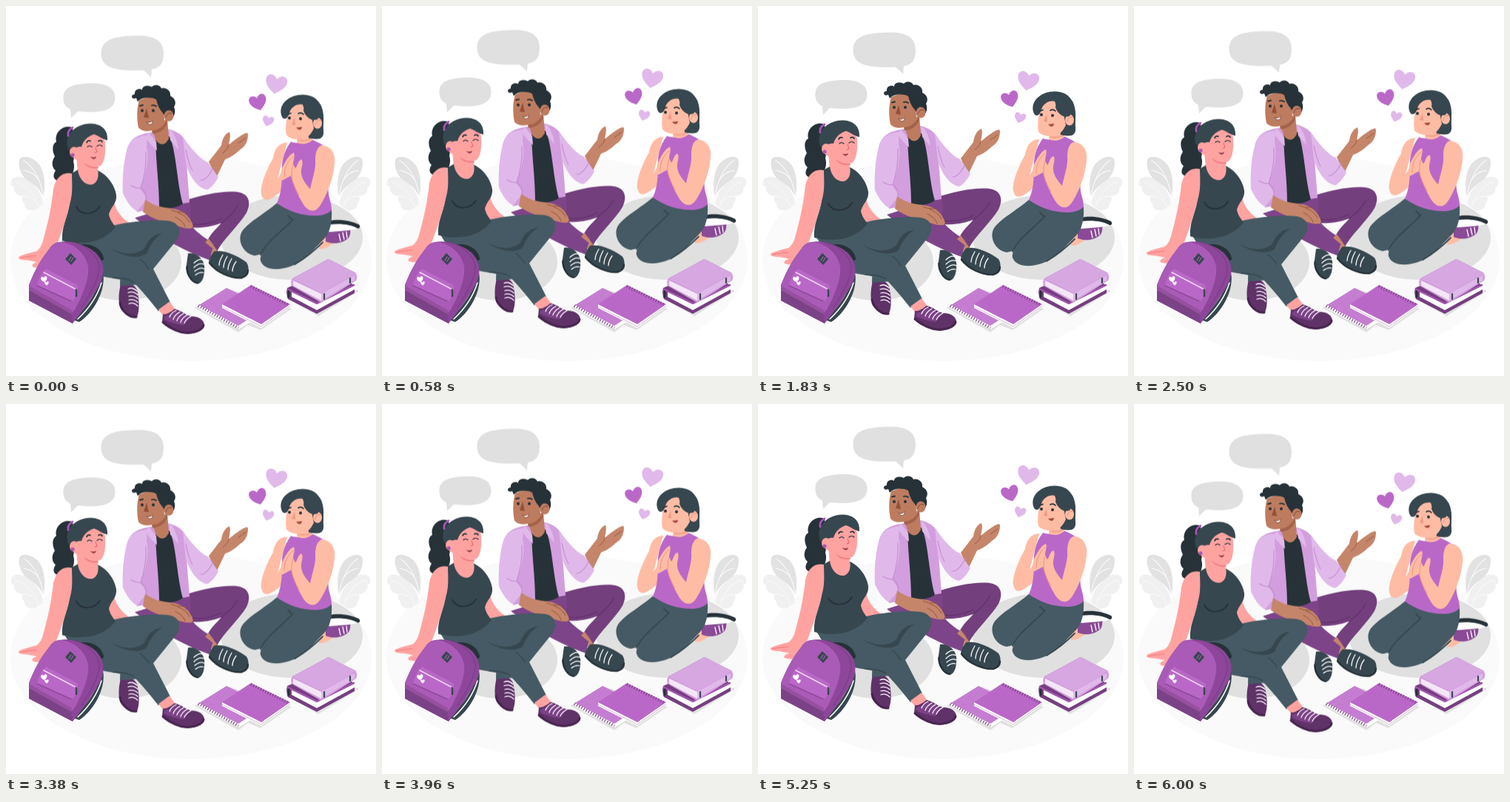
Write an HTML page that moves like this. It is 500x500 px and loops after 6.04 s.

```html
<!DOCTYPE html>
<html lang="en">
<head>
<meta charset="utf-8">
<title>Friends talking</title>
<style>
  html, body { margin: 0; width: 100%; height: 100%; overflow: hidden; background: #fff; }
  svg { display: block; width: 100vw; height: 100vh; }

  /* four 1.5 s bobs, then a 40 ms rest before the loop restarts */
  .float { animation: float 6.04s -.02s linear infinite; }
  @keyframes float {
    0%, 24.834%, 49.669%, 74.503%, 99.338%, 100% { transform: translateY(.6px); }
    12.417%, 37.252%, 62.086%, 86.921% { transform: translateY(-9.4px); }
  }

  .line { fill: none; stroke-linecap: round; stroke-linejoin: round; }
  .lace { fill: none; stroke: #fff; stroke-width: 1.3; stroke-linecap: round; }
  .coil { fill: none; stroke: #7c4287; stroke-width: 4; stroke-dasharray: 1.2 2.4; }
  .grey { fill: #e0e0e0; }
  .ink { fill: #263238; }
  .slate { fill: #37474f; }
  .denim { fill: #455a64; }
  .violet { fill: #ba68c8; }
  .lilac { fill: #e0b9ea; }
  .orchid { fill: #d29edd; }
  .plum { fill: #763f80; }
  .rose { fill: #ffa3a1; }
  .peach { fill: #ffbca5; }
  .brown { fill: #c5856a; }
  .tan { fill: #bd7c60; }
  .s-ink { stroke: #263238; }
  .s-slate { stroke: #37474f; }
</style>
</head>
<body>
<svg viewBox="0 0 500 500">
  <defs>
    <path id="heart" d="M0 9C-4 6-10 2-10-4C-10-10-3-11 0-5.5C3-11 10-10 10-4C10 2 4 6 0 9Z"/>
    <g id="plant">
      <path fill="#f0f0f0" d="M7 237C8 231 16 229 23 232C31 232 38 238 39 244C45 249 49 258 50 268L39 276C30 277 24 273 25 267C21 264 21 260 23 257C15 257 9 250 11 245C7 243 6 240 7 237Z"/>
      <path class="line" stroke="#fafafa" stroke-width="1" d="M13 238C28 242 39 254 44 271M23 257C31 257 36 260 40 264"/>
      <path fill="#e2e2e2" d="M51 258C54 240 52 220 42 211C32 202 20 202 18 208C16 216 20 228 27 234C34 239 43 243 51 258Z"/>
      <path class="line" stroke="#fafafa" stroke-width="1.1" d="M24 209C38 217 46 234 51 257M24 222C34 224 41 229 45 236"/>
    </g>
  </defs>

  <ellipse cx="250" cy="342" rx="244" ry="138" fill="#fafafa"/>
  <use href="#plant"/>
  <use href="#plant" transform="matrix(-.97 0 0 1 499 0)"/>
  <ellipse class="grey" cx="386" cy="313" rx="96" ry="57"/>
  <ellipse class="grey" cx="160" cy="346" rx="77" ry="52"/>

  <g id="notebooks">
    <path class="grey" d="M255 408L300 382L386 409L344 438L327 431L314 441Z"/>
    <path fill="#fff" d="M261 404L314 432L350 410V415L314 437L261 409Z"/>
    <path fill="#c57dd1" d="M298 381L352 407L314 432L261 404Z"/>
    <path class="coil" d="M260 405L314 435"/>
    <path fill="#fff" d="M292 403L345 430L384 403V407L345 435L292 408Z"/>
    <path class="line" stroke="#c8a5d0" stroke-width=".8" d="M292 406L345 433L384 405.5"/>
    <path class="violet" d="M331 377L384 403L345 430L292 403Z"/>
    <path class="coil" d="M331 379L382 404"/>
  </g>

  <g id="books">
    <path class="grey" d="M378 394L430 366L477 385L422 419Z"/>
    <path class="plum" d="M380 381L431 359L471 377V388L420 416L381 396Q378 388 380 381Z"/>
    <path fill="#fff" d="M386 386L420 403L471 378V383L420 411L386 393Z"/>
    <path class="line" stroke="#a557b3" stroke-width="2.500" d="M381 383L420 402L470 377"/>
    <path class="line s-ink" stroke-width="3" d="M382 386V393"/>
    <path class="orchid" d="M387 368L435 342L472 360Q476 366 473 371L426 401L386 378Q384 373 387 368Z"/>
    <path fill="#f4e6f7" d="M388 371L426 389V398L388 378Z"/>
    <path class="lilac" d="M426 389L471 364V371L426 398Z"/>
    <path fill="#d6a7e0" d="M387 368L437 342L473 361L427 388Z"/>
    <path class="line s-slate" stroke-width="2.2" d="M430 389V396M465 368V374"/>
  </g>

  <g class="float">
    <g id="bubbles" class="grey">
      <path d="M170 40C199 38 213 45 213 64C213 78 207 84 197 85L196 96L186 86.5C149 88 128 84 128.500 63C129 46 144 41 170 40Z"/>
      <path d="M112 104C135 103 148 110 147.500 124C147 138 135 143 112 143L97 142L88 151L87 139.500C80 136 77 131 77.500 122C78 109 92 105 112 104Z"/>
    </g>

    <use href="#heart" class="lilac" transform="translate(364.700 106)rotate(11)scale(1.45 1.38)"/>
    <use href="#heart" class="violet" transform="translate(341 130.500)rotate(-16)scale(1.17)"/>
    <use href="#heart" class="lilac" transform="translate(354 155.500)rotate(14)scale(.77)"/>

    <g id="listener">
      <path class="denim" d="M366 266C350 280 325 293 318 306C313 317 320 334 336 337C348 336 385 318 405 284Z"/>
      <path class="peach" d="M438 304L423 317L423 328C432 329 440 322 446 317Z"/>
      <path fill="#8a4a96" d="M432 309C439 299 455 301 465 299C466 305 465 310 463 313C454 321 443 322 432 318Z"/>
      <path class="lace" d="M450 308L452 317M455 306L457 315M460 305L461 313"/>
      <path fill="#fff" d="M437 294C452 292 466 294 475 300C470 303 465 302 462 303L437 305Z"/>
      <path class="ink" d="M437 290C450 287 467 290 477 295C480 298 477 301 475 300C466 295 452 293 437 295Z"/>
      <path class="denim" d="M366 266C385 279 420 286 440 275C441 292 438 304 431 313C419 326 401 345 386 351C370 357 349 358 344 344C342 334 354 324 365 315L390 290Z"/>
      <path class="line s-slate" stroke-width="1.800" d="M388 288C372 305 350 320 344 336M381 283L387 289M390 349C405 340 417 330 428 319"/>

      <path class="peach" d="M380 184C367 185 363 194 361 205C352 221 345 238 344.500 251C346 261 350 264 358 260C372 253 380 240 385 229L374 222L367 233Z"/>
      <path class="violet" d="M385 183C375 196 372 211 373 225C373 245 370 258 366 266C381 277 402 284 421 283C431 282 437 279 440 275C440 266 437 261 436 254L430 189C423 184 418 182 413 180C405 185 393 186 385 183Z"/>
      <path class="peach" d="M394 170H414V181C407 187 399 187 393 184Z"/>
      <path fill="#f6a78f" d="M394 178C402 182 409 180 414 174L413 179C407 184 399 184 394 181Z"/>
      <path class="peach" d="M426 188C438 188 446 198 444 213C442 236 432 258 424 270C417 280 408 277 402 268C394 255 388 241 385 229L374 235C369 236 371 220 376 213C380 205 385 199 389 198C391 202 388 208 388 213L391 219C394 216 394 209 399 207C402 208 400 216 399 221C398 231 404 239 411 247C414 232 419 220 418 208C418 197 421 190 426 188Z"/>
      <path class="line" stroke="#ee957f" stroke-width="1" d="M376 230C376 218 380 210 388 203M386 229C387 238 391 246 396 255M388 214C386 219 386 224 386 229"/>

      <path class="slate" d="M402 135C420 126 430 138 429 158C428 169 432 175 424 179C418 180 413 179 409 178Z"/>
      <path class="peach" d="M381 139C379 154 377 166 379 174C385 181 400 182 407 177C412 173 414 169 416 165L411 140L398 128Z"/>
      <path class="slate" d="M372 147C368 131 384 119 402 119.500C416 120 421 127 423 130C430 138 430 154 428 164L416 166C418 158 415 153 410 151C404 146 403 138 401 133C393 131 387 136 384 141C382 147 381 151 377 152C374 152 373 150 372 147Z"/>
      <ellipse class="peach" cx="421" cy="158" rx="6" ry="7.500"/>
      <path class="slate" d="M403 135C407 148 414 150 421 148L422 152C415 156 406 152 402 141Z"/>
      <path class="line" stroke="#e58d76" stroke-width="1" d="M418 160C419 155 422 153 425 154"/>
      <path fill="#f19b84" d="M390 150L386 160L391 161Z"/>
      <circle class="ink" cx="383" cy="151" r="2"/><circle class="ink" cx="398" cy="152" r="2"/>
      <path class="line s-ink" stroke-width="1.700" d="M381 146L385 144.500M395 145C398 143 400 144 402 146"/>
      <path fill="#a94c42" d="M392 164L400 163C400 167 396 169 392 164Z"/>
    </g>

    <g id="speaker">
      <path fill="#733f7d" d="M235 265C265 254 295 249 313 251C328 253 332 265 325 279C315 296 293 315 284 333L271 319C276 307 286 299 291 293C275 299 260 300 247 299Z"/>
      <path fill="#7e4489" d="M174 286L247 263C252 269 249 285 248 294C260 308 272 316 282 320L275 343C256 337 228 322 207 311Z"/>
      <path class="line" stroke="#61326b" stroke-width="1.200" d="M247 293C259 297 277 294 291 287M291 293C303 284 310 275 313 269"/>
      <path class="brown" d="M269 319L274 314L286 331L277 335L280 328Z"/>

      <path class="slate" d="M282 331C297 329 314 338 325 346C330 354 328 365 318 368C304 369 283 359 274 346C275 339 278 334 282 331Z"/>
      <path class="line s-ink" stroke-width="2.400" d="M275 347C285 360 304 368 318 367C325 365 327 361 327 357"/>
      <path class="lace" d="M293 336C290 341 288 345 288 350M299 338C296 343 294 347 294 353M305 341C302 346 300 350 300 356M311 345C308 349 306 353 306 358"/>
      <path class="slate" d="M246 334C256 332 266 340 268 350C269 363 266 374 259 375C249 374 242 360 244 349Z"/>
      <path class="line s-ink" stroke-width="2.400" d="M244.500 352C244 362 251 373 259 374"/>
      <path class="lace" d="M254 347C259 342 263 341 267 343M254 353C259 348 264 347 268 349M255 358C260 354 265 353 268 355M256 363C260 360 264 359 267 360"/>

      <path class="brown" d="M274 210L291 188C292 179 297 171 302 170C304 174 302 182 301 187C309 181 319 172 326 171L327 173C327 183 323 190 316 194C307 203 300 205 296 207L284 232Z"/>
      <path class="line" stroke="#995a40" stroke-width="1" d="M301 187C300 193 296 196 293 198M314 185L324 178"/>

      <path class="orchid" d="M193 171C176 174 166 180 164 195L177 278L248 265L244 213L244 184C238 172 228 168 219 166Z"/>
      <path class="lilac" d="M239 177C249 190 261 206 273 211L287 231C283 238 278 245 272 248C259 246 249 231 243 214Z"/>
      <path class="line" stroke="#c58bd2" stroke-width="1.100" d="M243 194C245 204 247 214 252 222M263 235C269 235 275 228 280 218"/>
      <path class="ink" d="M202 181L221 176C230 194 231 240 239 267C228 274 217 274 207 271C207 241 203 216 202 181Z"/>
      <path class="lilac" d="M193 171L203 183L204 195C198 190 192 183 189 177ZM220 167L224 169C229 176 232 184 233 194L222 181Z"/>
      <path class="lilac" d="M191 174C174 176 165 183 163 195C158 214 157 238 158 253C163 263 168 272 177 277L189 262C190 255 183 250 182 246C189 229 194 205 190 190Z"/>
      <path class="line" stroke="#c58bd2" stroke-width="1.100" d="M189 197C190 214 187 231 182 246C177 246 172 244 169 242M182 246C188 250 190 256 189 261"/>

      <path class="brown" d="M188 261C198 269 210 272 223 273C235 274 246 281 250 290C254 296 253 300 250 300C243 301 232 298 225 293C211 292 198 287 185 278Z"/>
      <path class="line" stroke="#91543c" stroke-width="1" d="M232 279C239 281 245 286 248 292M229 285C237 289 241 294 242 298M223 275C229 279 237 277 243 279"/>

      <path class="tan" d="M196 163L218 152L220 179C215 188 210 189 203 182Z"/>
      <path fill="#a4624a" d="M197 168C206 168 213 162 217 154L218 158C214 167 207 172 198 172Z"/>
      <path class="tan" d="M180 127C176 140 177 155 179 164C185 172 205 170 214 157L213 129L201 119Z"/>
      <path class="ink" d="M178 129L176 124C169 127 168 119 174 119C173 112 181 110 184 113C184 106 194 107 197 109C201 104 209 107 210 111C217 109 223 115 222 121C230 125 230 132 227 136C231 145 225 153 219 155L211 143C205 136 204 129 203 126C195 122 183 123 178 129Z"/>
      <ellipse class="tan" cx="220" cy="148" rx="6.500" ry="7.500"/>
      <path class="line" stroke="#824a33" stroke-width="1" d="M216 150C218 145 221 143 224 145"/>
      <path fill="#955039" d="M190 138L186 150L193 151Z"/>
      <circle class="ink" cx="184" cy="141" r="2"/><circle class="ink" cx="199" cy="141" r="2"/>
      <path class="line s-ink" stroke-width="1.900" d="M181 134.500L185 133.500M197 134C199 133 201 134 203 135"/>
      <path fill="#fff" stroke="#71372b" stroke-width=".8" d="M190 156C193 158 196 157 198 154.500C199 160 193 162 190 156Z"/>
    </g>

    <g id="sitter">
      <path class="ink" d="M90 164C77 159 65 171 68 183C61 187 63 197 66 203C60 211 63 219 67 222C61 231 66 237 75 236C87 236 95 222 91 210C94 200 88 190 91 180Z"/>
      <path class="rose" d="M146 264C149 278 157 286 168 294L149 303C141 293 137 286 137 278Z"/>

      <path fill="#5f3268" d="M155 375C163 371 173 375 177 383C180 396 181 410 177 420C169 424 158 415 154 407C151 395 153 385 155 375Z"/>
      <path class="line" stroke="#482450" stroke-width="3" d="M154 401C156 411 166 421 176 420"/>
      <path class="lace" d="M165 382C169 380 173 381 177 385M165 387C170 385 175 387 178 390M166 392C171 390 176 393 178 395M166 397C171 395 176 398 178 400M166 402C171 400 175 402 178 405"/>

      <path class="denim" d="M146 296C170 290 205 288 220 290C236 293 238 307 229 318L182 376L154 378L155 340L125 327Z"/>
      <path class="slate" d="M140 326C158 337 177 337 187 327C193 313 201 308 211 307C200 313 194 325 190 334C180 342 158 339 140 326Z"/>
      <path class="denim" d="M77 313L147 297L141 327C151 335 166 339 181 341C193 344 197 350 200 357L222 400L206 412C195 398 181 381 173 374C160 369 135 367 105 360Z"/>
      <path class="line s-slate" stroke-width="1.300" d="M173 373C167 369 155 367 145 367M181 342C186 345 190 350 193 355"/>
      <path class="rose" d="M206 410L221 399L229 410L214 420Z"/>
      <path fill="#5f3268" d="M212 416C218 417 224 412 228 409C237 411 242 417 250 419C262 419 269 425 268 433C262 443 246 444 235 441C224 437 213 432 211 427Z"/>
      <path class="line" stroke="#482450" stroke-width="3" d="M212 427C223 436 237 443 250 441C259 440 266 436 267 431"/>
      <path fill="#7c4287" d="M214 419L223 416L229 411L249 420L240 431C230 430 218 426 214 423Z"/>
      <path class="lace" d="M230 411C225 413 222 417 221 420M235 413C230 416 227 419 226 423M240 415C235 418 232 421 231 425M245 417C240 420 237 423 236 427M250 419C245 422 242 425 241 428"/>

      <path class="rose" d="M95 202L97 226C100 242 117 246 126 236L124 220L112 212Z"/>
      <path fill="#f37f84" d="M105 211C111 216 118 218 124 216L125 219C115 220 108 217 105 211Z"/>
      <path class="slate" d="M88 226L97 221C99 235 108 242 116 241C123 239 126 231 124 222C136 227 147 241 149 255C150 267 142 270 139 281C140 288 145 294 148 298C130 322 96 323 76 317C75 295 84 285 86 265C91 250 87 237 88 226Z"/>
      <path class="line s-ink" stroke-width="1.800" d="M95 271C101 283 119 283 127 270"/>
      <path class="rose" d="M89 226C76 223 67 232 64 247C61 275 56 295 51 313C49 322 46 328 41 331C31 334 20 336 17 339C16 342 22 343 28 343C34 344 40 345 42 346C37 347 34 350 36 352C40 354 47 354 50 353C59 348 63 341 65 333C73 311 81 290 86 268C91 252 89 238 89 226Z"/>
      <path class="line" stroke="#f0767d" stroke-width="1" d="M20 340C28 338 35 338 41 337"/>

      <path class="rose" d="M98 179C105 168 132 168 134 184C135 200 133 212 127 216C117 219 107 214 103 208C98 209 90 207 88 199Z"/>
      <path class="slate" d="M84 193C77 175 94 158 115 158.500C130 159 138 168 137 181C130 180 126 175 119 173C109 176 104 183 102 190C95 189 91 194 86 196Z"/>
      <ellipse class="rose" cx="92" cy="197" rx="6" ry="7"/>
      <circle fill="#a855b8" cx="90" cy="201" r="2.600"/>
      <path class="line" stroke="#a855b8" stroke-width="2.800" d="M84 175C83 170 86 166 90 164"/>
      <path class="line s-ink" stroke-width="1.700" d="M109 184C110 182 112 181 114 182M125 182C127 181 129 181 130 183"/>
      <path class="line s-ink" stroke-width="1.200" d="M110 190C112 188 114 188 116 190M123 189C125 187 128 187 130 189"/>
      <path class="line" stroke="#e85e69" stroke-width="1" d="M121 191L123 197L120 198"/>
      <path fill="#923e48" d="M114 203C117 205 120 204 122 203C121 208 116 207 114 203Z"/>
    </g>
  </g>

  <g id="bag">
    <path class="line s-ink" stroke-width="6" d="M103 325C116 324 127 331 129 341"/>
    <path class="slate" d="M131 360C136 385 117 416 99 427L90 424C111 405 123 387 131 360Z"/>
    <path class="line" stroke="#fff" stroke-width="1.500" d="M129 374C123 393 111 410 97 423"/>
    <path fill="#8d4699" d="M72 319C86 316 106 322 118 331C133 343 134 358 128 374C118 392 104 412 90 429L31 398V377C38 360 45 345 58 329Q63 320 72 319Z"/>
    <path fill="#a95bb7" d="M72 319C89 319 108 333 111 352C113 369 103 391 94 409L88 416L31 381V377C38 360 45 345 58 329Q63 320 72 319Z"/>
    <path class="line" stroke="#763b82" stroke-width="1" d="M90 319C109 324 123 336 126 351C128 365 114 389 102 407"/>
    <path fill="#7c4287" d="M31 379L88 412L90 429L31 398Z"/>
    <path fill="#97509f" d="M31 378L89 411L88 416L31 384Z"/>
    <path class="violet" d="M54 355L96 377Q98 379 97 382L92 397Q90 399 87 397L42 377Q46 361 54 355Z"/>
    <path class="line" stroke="#87458f" stroke-width="1.200" d="M42 378L88 399"/>
    <path class="line" stroke="#eed7f2" stroke-width="1.500" d="M51 360L93 382"/>
    <path class="line s-slate" stroke-width="2.400" d="M95 384V392"/>
    <use href="#heart" fill="#fff" transform="translate(51.500 369.500)rotate(-8)scale(.42)"/>
    <use href="#heart" fill="#fff" transform="translate(55 375)rotate(-8)scale(.28)"/>
    <path class="slate" d="M87 334L95 342L88 350L80 342Z"/>
    <path class="line" stroke="#a95bb7" stroke-width="1.200" d="M85 344L88 339M88 345L91 340"/>
  </g>
</svg>
</body>
</html>
```
